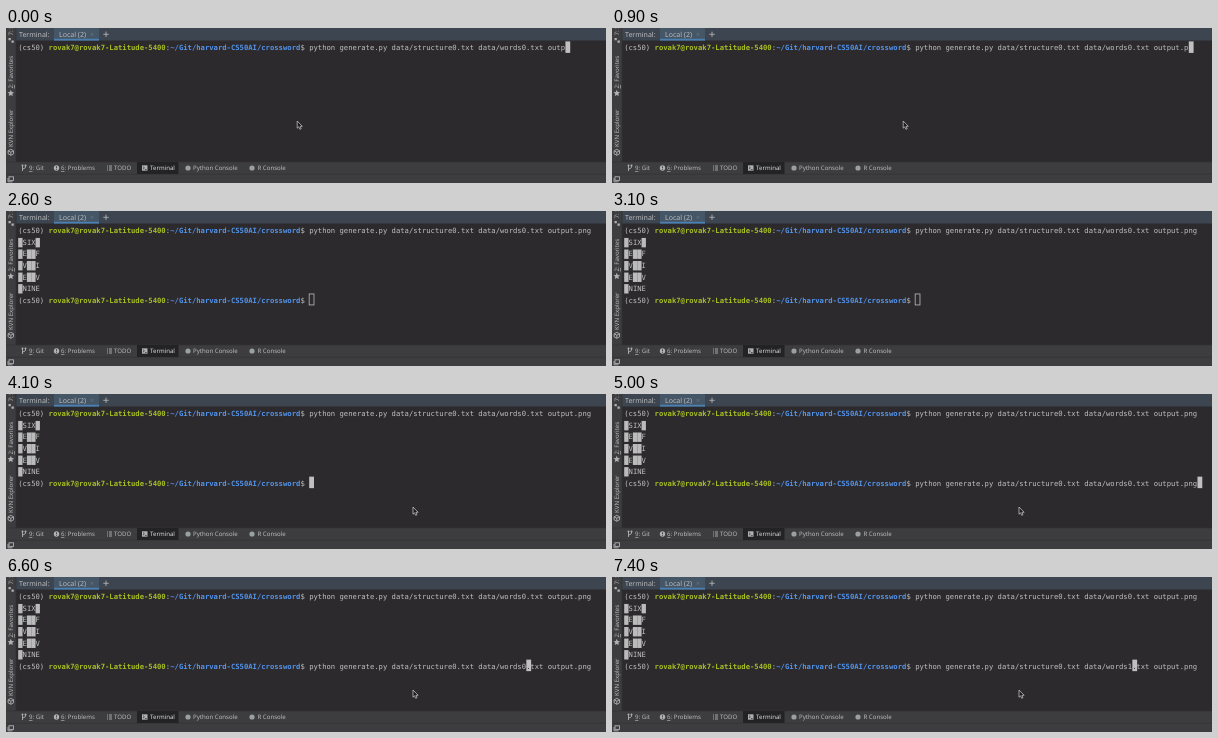
These frames come from a looping animation (600x155 px, 8000 ms). An HTML page:

```html
<!DOCTYPE html>
<html lang="en">
<head>
<meta charset="utf-8">
<title>Terminal</title>
<style>
  html, body { margin: 0; width: 100%; height: 100%; overflow: hidden; background: #2c2a2d; }
  svg { display: block; width: 600px; height: 155px; }
  text { font: 6.1px "Noto Sans", "Open Sans", sans-serif; fill: #bbb; white-space: pre; text-rendering: geometricPrecision; }
  .head text { font-size: 7px; }
  #term text { font: 7.214px "DejaVu Sans Mono", "Noto Sans Mono", monospace; fill: #c0c0c0; }
  #term .user { fill: #a8c023; font-weight: 700; }
  #term .path { fill: #5394ec; font-weight: 700; }
  #term .under { fill: #2c2a2d; }
  .u { text-decoration: underline; }
  .icon { fill: none; stroke: #afb1b3; stroke-width: .9; }
  .solid { fill: #afb1b3; }
</style>
</head>
<body>
<svg viewBox="0 0 600 155">
  <rect width="600" height="155" fill="#2c2a2d"/>
  <g class="head">
    <rect x="10" width="590" height="12.5" fill="#3c4550"/>
    <rect x="48" width="45" height="12.5" fill="#455667"/>
    <rect x="48" y="10.8" width="45" height="1.7" fill="#4a80b4"/>
    <text x="13" y="8.6">Terminal:</text>
    <text x="53" y="8.6">Local (2)</text>
    <path class="icon" d="M84.5 4.8l3 3m0-3l-3 3" opacity=".25"/>
    <path class="icon" d="M97.3 6.3h5.4M100 3.6v5.4"/>
  </g>

  <rect width="10" height="155" fill="#3d3d40"/>
  <path d="M10 0V134" stroke="#323234" stroke-width=".7"/>
  <text transform="translate(7 7.5) rotate(-90)">7: Structure</text>
  <path class="solid" d="M2.5 10h2.3v2.3h-2.3zM5.5 12.5h2.3v2.3h-2.3z"/>
  <text transform="translate(7 60.5) rotate(-90)"><tspan class="u">2</tspan>: Favorites</text>
  <path class="solid" d="M4.8 61.8l1 2.2 2.3.2-1.8 1.6.6 2.3-2.1-1.2-2.1 1.2.6-2.3-1.8-1.6 2.3-.2z"/>
  <text transform="translate(7 119) rotate(-90)">KVN Explorer</text>
  <path class="icon" d="M4.8 121.3l2.7 1.5v3l-2.7 1.5-2.7-1.5v-3zM2.1 122.8l2.7 1.4 2.7-1.4M4.8 124.2v3"/>

  <rect y="134" width="600" height="21" fill="#3d3d40"/>
  <path d="M0 134H600M0 146.2H600" stroke="#323234" stroke-width=".7"/>
  <rect x="131" y="134" width="41.5" height="12" fill="#232224"/>
  <path class="icon" d="M16.5 137v6M19.5 137v2q0 1.5-3 2"/>
  <circle class="solid" cx="16.5" cy="137.5" r="1"/>
  <circle class="solid" cx="19.5" cy="137.5" r="1"/>
  <text x="23" y="142.2"><tspan class="u">9</tspan>: Git</text>
  <circle class="solid" cx="50.5" cy="140" r="2.7"/>
  <path d="M50.5 138.3v2m0 .7v.8" stroke="#3d3d40" stroke-width=".9"/>
  <text x="55" y="142.2"><tspan class="u">6</tspan>: Problems</text>
  <path class="icon" d="M101 138h1m1 0h3M101 140h1m1 0h3M101 142h1m1 0h3"/>
  <text x="108" y="142.2">TODO</text>
  <rect class="solid" x="136" y="137.3" width="5.5" height="5.4"/>
  <path d="M137 138.6l1.4 1.3-1.4 1.3M139 141.6h1.7" fill="none" stroke="#232224" stroke-width=".7"/>
  <text x="144" y="142.2" style="fill:#ddd">Terminal</text>
  <circle cx="182" cy="140" r="2.6" fill="#9a9fa2"/>
  <text x="187" y="142.2">Python Console</text>
  <circle cx="246" cy="140" r="2.6" fill="#9a9fa2"/>
  <text x="251.5" y="142.2">R Console</text>
  <rect class="icon" x="3" y="148.8" width="4.5" height="3.6"/>
  <path class="icon" d="M2 150v3.8h4.5"/>

  <g id="term"></g>
  <path id="mouse" d="M0 0V7.2L1.6 5.8 2.7 8.3 4 7.7 2.9 5.3H5.1Z" fill="#1c1b1d" stroke="#d5d5d5" stroke-width=".7"/>
</svg>
<script>
const $ = id => document.getElementById(id);
const LOOP = 8000, X0 = 12.2, CELL = 4.343, TOP = 13.4, ROW = 11.54, PROMPT = 67;
const COMMAND = 'python generate.py data/structure0.txt data/words0.txt output.png';
const GRID = ['█SIX█', '█E██F', '█V██I', '█E██V', '█NINE'];
const TYPED = [0, 300, 400, 600, 900, 1100, 1200];

const colX = col => X0 + col * CELL;
const rowY = row => TOP + row * ROW;
const textAt = (row, col, body, cls = '') =>
  `<text class="${cls}" x="${colX(col)}" y="${rowY(row) + 9}">${body}</text>`;
const boxAt = (row, col, top, width, height, style) =>
  `<rect x="${colX(col)}" y="${rowY(row) + top}" width="${width}" height="${height}" ${style}/>`;

const promptLine = (row, command) =>
  textAt(row, 0, '(cs50)') +
  textAt(row, 7, 'rovak7@rovak7-Latitude-5400', 'user') +
  textAt(row, 34, ':') +
  textAt(row, 35, '~/Git/harvard-CS50AI/crossword', 'path') +
  textAt(row, 65, '$') +
  textAt(row, PROMPT, command);

const gridLine = (line, i) => [...line].map((c, col) =>
  c === '█' ? boxAt(i + 1, col, 2, CELL, 9.4, 'fill="#bbb"') : textAt(i + 1, col, c)).join('');

// Second command: recalled, walked back through, then one digit replaced
function recalled(t) {
  if (t < 5000) return ['', 0];
  if (t < 6900) {
    const steps = Math.max(0, Math.min(6, Math.floor(t / 100) - 60));
    return [COMMAND, 65 - Math.round(steps * 2.5)];
  }
  return t < 7200 ? [COMMAND.replace('words0', 'words'), 49]
                  : [COMMAND.replace('words0', 'words1'), 50];
}

function terminal(t) {
  const count = 58 + TYPED.filter(k => k <= t).length;
  let out = promptLine(0, COMMAND.slice(0, count));
  let row = 0, col = PROMPT + count, under = '';
  if (t >= 1300) { row = 1; col = 0; }
  if (t >= 1400) { out += GRID.map(gridLine).join(''); row = 6; }
  if (t >= 1500) {
    const [command, pos] = recalled(t);
    out += promptLine(6, command);
    col = PROMPT + pos;
    under = command[pos] || '';
  }
  const blinkOff = t >= 100 && t < 300 || t >= 5500 && t < 6100;
  const unfocused = t >= 2400 && t < 4100;
  if (blinkOff) return out;
  if (unfocused) return out + boxAt(row, col, .3, 4.8, 11, 'fill="none" stroke="#bbb" stroke-width=".8"');
  return out + boxAt(row, col, 0, 4.8, 11.5, 'fill="#c0c0c0"') + textAt(row, col, under, 'under');
}

function mousePos(t) {
  if (t < 2400) return [291.2, 93];
  if (t < 3600) return [-20, -20];
  const p = Math.min(1, (Math.floor(t / 100) - 35) / 4), e = p * (2 - p);
  return [456 - 49 * e, -40 + 153 * e];
}

let last = '';
function draw(now) {
  const t = now % LOOP;
  const view = terminal(t);
  if (view !== last) $('term').innerHTML = last = view;
  $('mouse').setAttribute('transform', `translate(${mousePos(t)})`);
}

const start = performance.now();
function tick() {
  draw(performance.now() - start);
  requestAnimationFrame(tick);
}
tick();
</script>
</body>
</html>
```
